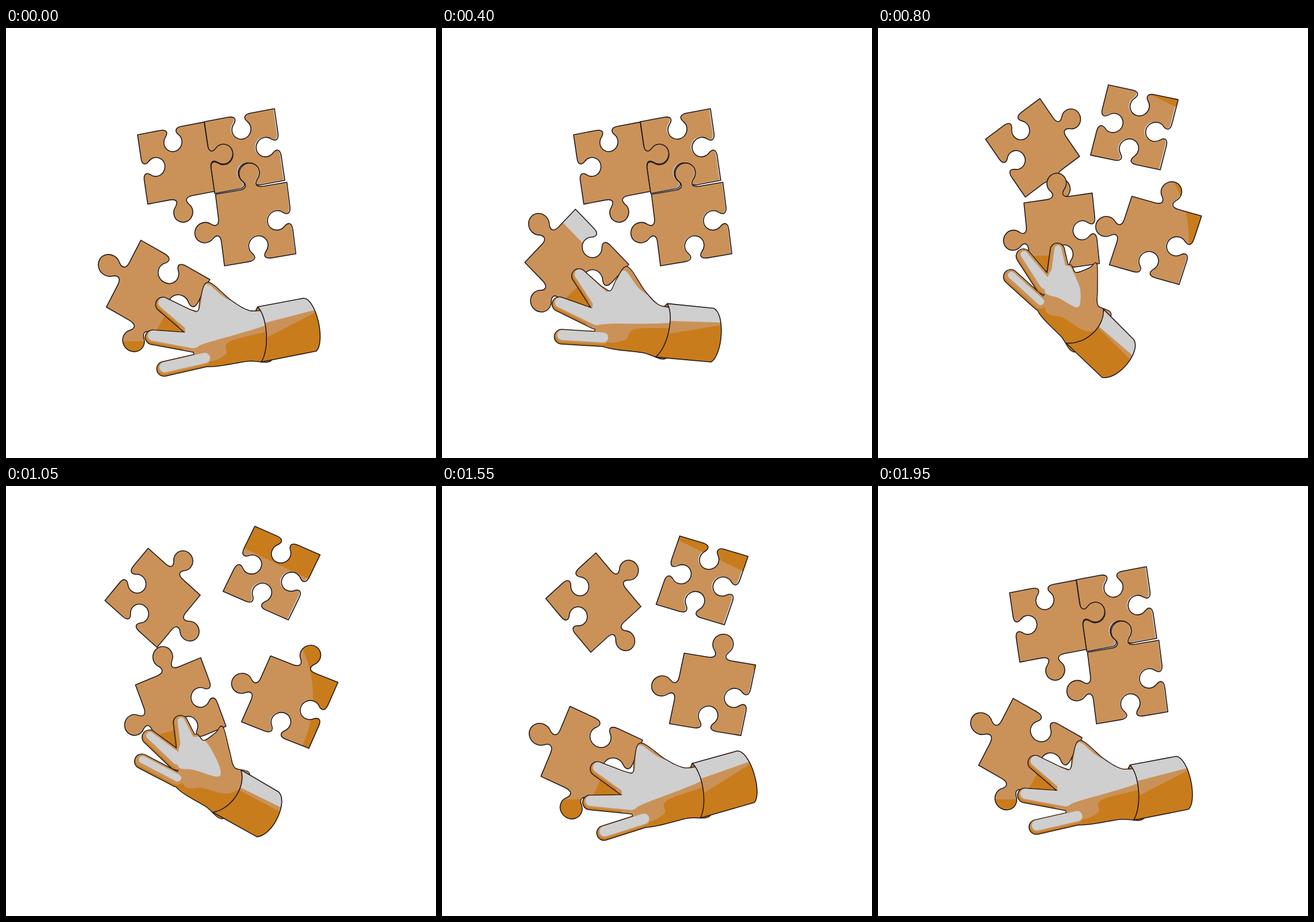
These frames come from a looping animation (748x748 px, 2 s). An HTML page:

```html
<!DOCTYPE html>
<html lang="en">
<head>
<meta charset="utf-8">
<title>Puzzle hand</title>
<style>
  html, body { margin: 0; width: 100%; height: 100%; overflow: hidden; background: #fff; }
  svg { display: block; width: 100vw; height: 100vh; }
  .line { fill: none; stroke: #21171b; stroke-width: 1.6; stroke-linejoin: round; vector-effect: non-scaling-stroke; }
  .rim { stroke-width: 3; }
  .light { fill: #cfcfcf; }
  .mid { fill: #ca9258; }
  .dark { fill: #c97c1b; }
</style>
</head>
<body>
<svg id="stage" viewBox="0 0 748 748"></svg>
<script>
const LOOP = 2000, STEP = 50;
const stage = document.getElementById('stage');
const $ = id => document.getElementById(id);
const setPath = (id, d) => $(id).setAttribute('d', d);
const rad = Math.PI / 180;

const clamp = s => Math.min(1, Math.max(0, s));
const smoothstep = s => (s = clamp(s)) * s * (3 - 2 * s);
const lerp = (a, b, s) => a + (b - a) * s;
const mix = (p, q, s) => [lerp(p[0], q[0], s), lerp(p[1], q[1], s)];
const bump = (t, at, width) => Math.exp(-(((t - at) / width) ** 2));

// Unit jigsaw outline; sides run top, right, bottom, left: 1 = tab, -1 = notch.
function jigsaw(sides) {
  let d = 'M0 0';
  sides.forEach((sign, i) => {
    const [x, y, dx, dy] = [[0, 0, 1, 0], [1, 0, 0, 1], [1, 1, -1, 0], [0, 1, 0, -1]][i];
    const k = sign > 0 ? 1 : .95;
    const at = (s, p) => {
      const u = .5 + (s - .5) * k, v = p * k * sign;
      return `${x + dx * u + dy * v} ${y + dy * u - dx * v} `;
    };
    d += `L${at(.33, 0)}C${at(.43, 0)}${at(.45, .05)}${at(.4, .11)}`
      + `A${.141 * k} ${.141 * k} 0 1 ${sign > 0 ? 1 : 0} ${at(.6, .11)}`
      + `C${at(.55, .05)}${at(.57, 0)}${at(.67, 0)}L${x + dx} ${y + dy}`;
  });
  return d + 'Z';
}

// Place the unit piece around its centre; the view skews it slightly.
function matrix({ x, y, angle, w, h }, dx = 0, dy = 0) {
  const a = angle * rad, b = (angle + 92.4) * rad;
  const ux = w * Math.cos(a), uy = w * Math.sin(a), vx = h * Math.cos(b), vy = h * Math.sin(b);
  return `matrix(${ux} ${uy} ${vx} ${vy} ${x - (ux + vx) / 2 + dx} ${y - (uy + vy) / 2 + dy})`;
}

// Pieces burst from home to away, peak, then fall back faster and faster.
const BURST = 580, RETURN = 850;
const spread = (t, peak) => t < peak
  ? 1 - (1 - clamp((t - BURST) / (peak - BURST))) ** 1.7
  : 1 - clamp((t - peak) / RETURN) ** 3;

// home and away: centre x, centre y, angle
const pieces = {
  B: { sides: [-1, -1, -1, -1], size: [124, 126], rim: 2.4, peak: 1050, home: [415, 214, -10.6], away: [462, 151.5, 23.6] },
  A: { sides: [-1, 1, 1, -1], size: [118, 122], rim: .7, peak: 1050, home: [295.7, 235, -10.8], away: [255, 194.5, -50.4] },
  C: { sides: [1, -1, -1, 1], size: [126, 125.5], rim: 1.6, peak: 930, home: [434.3, 341, -9.6], away: [493.7, 376, 21.5] },
  D: { sides: [1, -1, -1, 1], rim: 1 }
};

function loosePose({ size: [w, h], home, away, peak }, t) {
  const p = spread(t, peak);
  const [x, y, angle] = home.map((v, i) => lerp(v, away[i], p));
  return { x, y, angle, w, h };
}

function heldPose([x, y, angle]) {
  return { x, y, angle: angle - 62.7, w: 131 - .2 * angle, h: 138 - .27 * angle };
}

// Key poses of the hand: time, pivot x, pivot y, angle
const handKeys = [
  [0, 264.5, 461.5, 0],
  [400, 234.5, 409.5, 16.3],
  [800, 319.5, 357, 54.5],
  [1050, 304, 382, 40],
  [1350, 265, 461.5, 0],
  [1550, 260.5, 473.5, -4.8],
  [1950, 265, 461.8, 0],
  [LOOP, 264.5, 461.5, 0]
];

// Monotone cubic through the keys.
function handAt(t) {
  const slope = (i, j) => (handKeys[i + 1][j] - handKeys[i][j]) / (handKeys[i + 1][0] - handKeys[i][0]);
  const tangent = (i, j) => {
    if (i === 0 || i === handKeys.length - 1) return 0;
    const a = slope(i - 1, j), b = slope(i, j);
    return a * b <= 0 ? 0 : 2 * a * b / (a + b);
  };
  const i = Math.max(0, handKeys.findIndex(k => k[0] > t) - 1);
  const h = handKeys[i + 1][0] - handKeys[i][0], s = (t - handKeys[i][0]) / h, r = 1 - s;
  return [1, 2, 3].map(j => lerp(handKeys[i][j], handKeys[i + 1][j], smoothstep(s))
    + h * s * r * (tangent(i, j) * r - tangent(i + 1, j) * s));
}

// Key points of the hand seen flat and rolled; the rest blends between them.
const views = {
  palm: [
    '352,443 392,475 422,492 462,500 464,574 420,579 345,588 325,560 315,522 314,491 334,493 339,470',
    '380,411 381,455 382,483 404,502 347,562 318,535 278,490 292,460 300,432 332,412 344,426 368,418'],
  tone: [
    '345,430 480,470 480,517 390,545 382,568 345,579 300,540',
    '350,395 405,440 408,500 368,528 322,504 292,492 290,430'],
  glow: [
    '348,446 390,474 470,494 462,513 358,545 320,552 312,505 336,490',
    '341,428 351,452 352,475 345,486 315,470 290,458 304,418 331,414'],
  index: ['273,481 325,515', '312,387 314,430'],
  middle: ['255,538 325,547', '253,397 290,447'],
  little: ['275,593 345,577', '231,433 282,479'],
  cuff: [
    '438,485 518,470 540,472 556,545 540,562 444,581 458,560 456,505',
    '392,489 445,542 458,562 420,612 390,608 327,548 360,552 395,520']
};
const viewFrames = [handKeys[0], handKeys[2]];
const baseRadius = { index: 20, middle: 16, little: 12 };
const TIP = 12;

const turn = ([x, y], deg) => {
  const c = Math.cos(deg * rad), s = Math.sin(deg * rad);
  return [x * c - y * s, x * s + y * c];
};
const local = {};
for (const name in views) {
  local[name] = views[name].map((text, k) => {
    const [, cx, cy, deg] = viewFrames[k];
    return text.split(' ').map(pair => {
      const [x, y] = pair.split(',').map(Number);
      return turn([x - cx, y - cy], -deg);
    });
  });
}
const rollOf = angle => smoothstep((angle - 8) / 40);

function posed(name, [cx, cy, deg]) {
  const [flat, rolled] = local[name];
  return flat.map((p, i) => {
    const [x, y] = turn(mix(p, rolled[i], rollOf(deg)), deg);
    return [x + cx, y + cy];
  });
}

const polygon = pts => 'M' + pts.join('L') + 'Z';

function smooth(pts) {
  const n = pts.length, at = i => pts[(i + n) % n];
  const handle = (p, a, b) => [p[0] + (b[0] - a[0]) / 6, p[1] + (b[1] - a[1]) / 6];
  return 'M' + pts[0] + pts.map((p, i) => {
    const q = at(i + 1);
    return `C${handle(p, at(i - 1), q)} ${handle(q, at(i + 2), p)} ${q}`;
  }).join('') + 'Z';
}

// Tapered capsule; inset and shift turn it into the lit part of a finger.
function finger([tip, base], radius, inset = 0, dx = 0, dy = 0) {
  const r = TIP - inset, R = radius - inset;
  const len = Math.hypot(tip[0] - base[0], tip[1] - base[1]);
  const nx = (base[1] - tip[1]) / len, ny = (tip[0] - base[0]) / len;
  const at = ([x, y], k) => `${x + nx * k + dx} ${y + ny * k + dy} `;
  return `M${at(base, R)}L${at(tip, r)}A${r} ${r} 0 0 0 ${at(tip, -r)}L${at(base, -R)}A${R} ${R} 0 0 0 ${at(base, R)}Z`;
}

const fingers = Object.keys(baseRadius), limbs = ['palm', ...fingers];
const path = (id, cls = '') => `<path id="${id}" class="${cls}"/>`;
const flood = cls => `<rect class="${cls}" width="748" height="748"/>`;
const clipped = (id, masks, inner) =>
  `<clipPath id="${id}Clip">${masks.map(m => path(m)).join('')}</clipPath><g clip-path="url(#${id}Clip)">${inner}</g>`;
const shades = {
  A: '',
  B: path('shadeB', 'dark'),
  C: '<path id="shadeC" class="dark" fill-rule="evenodd"/>',
  D: path('shadow', 'dark') + '<rect class="dark" y="545" width="748" height="203"/>'
    + '<rect id="glint" class="light" y="-.1" width="1" height=".58"/>'
};

stage.innerHTML = Object.keys(pieces).map(id =>
  clipped(id, [id + 'Mask'], flood('light') + path(id + 'Face', 'mid') + shades[id]) + path(id + 'Line', 'line')).join('')
  + path('mouth', 'dark') + path('mouthLine', 'line')
  + limbs.map(id => path(id + 'Line', 'line rim')).join('')
  + clipped('hand', limbs.map(id => id + 'Mask'),
    flood('dark') + path('tone', 'mid') + fingers.map(id => path(id + 'Tone', 'mid')).join('')
    + path('glow', 'light') + fingers.map(id => path(id + 'Glow', 'light')).join(''))
  + clipped('cuff', ['cuffMask'], flood('dark') + path('cuffTone', 'mid') + path('cuffGlow', 'light'))
  + path('cuffLine', 'line');

for (const id in pieces) {
  const d = jigsaw(pieces[id].sides);
  for (const part of ['Mask', 'Face', 'Line']) setPath(id + part, d);
}

function drawPieces(t, hand) {
  for (const id in pieces) {
    const piece = pieces[id];
    const pose = id === 'D' ? heldPose(hand) : loosePose(piece, t);
    for (const part of ['Mask', 'Line']) $(id + part).setAttribute('transform', matrix(pose));
    $(id + 'Face').setAttribute('transform', matrix(pose, -piece.rim, -piece.rim / 3));
  }
  const y = 70 + 60 * spread(t, pieces.B.peak), cx = 370 - 36 * spread(t, pieces.C.peak);
  setPath('shadeB', `M360 0H600V${y + 67}L360 ${y - 48}Z`);
  setPath('shadeC', `M0 0H748V748H0ZM${cx - 200} 367a200 200 0 1 0 400 0a200 200 0 1 0-400 0Z`);
  $('glint').setAttribute('transform', matrix(heldPose(hand)));
  $('glint').setAttribute('x', 1.05 - .3 * bump(t, 400, 120));
}

function drawHand(hand) {
  const roll = rollOf(hand[2]), shape = name => posed(name, hand);
  const outline = (id, d) => { setPath(id + 'Mask', d); setPath(id + 'Line', d); };
  outline('palm', smooth(shape('palm')));
  for (const id of fingers) {
    const bone = shape(id), radius = baseRadius[id];
    outline(id, finger(bone, radius));
    setPath(id + 'Tone', finger(bone, radius, 1, .5, -2));
    setPath(id + 'Glow', finger(bone, radius, 3 + 3 * roll, 1, -3));
  }
  setPath('tone', smooth(shape('tone')));
  setPath('glow', smooth(shape('glow')));
  const [tip, base] = shape('index'), [tip2, base2] = shape('middle');
  setPath('shadow', polygon([mix(tip, base, .2), tip2, base2]));
}

function drawCuff(t, hand) {
  const [a, b, c, d, e, f, g, h] = posed('cuff', hand), roll = rollOf(hand[2]);
  const cuff = `M${a}L${b}C${c} ${d} ${e}L${f}C${g} ${h} ${a}Z`;
  setPath('cuffMask', cuff);
  setPath('cuffLine', cuff);
  const opposite = p => [a[0] + f[0] - p[0], a[1] + f[1] - p[1]];
  const mouth = `M${a}C${opposite(g)} ${opposite(h)} ${f}C${g} ${h} ${a}Z`;
  setPath('mouth', mouth);
  setPath('mouthLine', mouth);
  const band = (near, far) => {
    const p = mix(a, f, near), q = mix(b, e, far);
    return polygon([a, mix(a, b, 1.6), mix(p, q, 1.6), p]);
  };
  setPath('cuffTone', band(lerp(.62, .34, roll), .34));
  setPath('cuffGlow', band(.32, .26));
  $('cuffGlow').setAttribute('opacity', 1 - bump(t, 1350, 50));
}

const start = performance.now();
function tick() {
  const elapsed = (performance.now() - start) % LOOP;
  const t = Math.floor(elapsed / STEP) * STEP, hand = handAt(t);
  drawPieces(t, hand);
  drawHand(hand);
  drawCuff(t, hand);
  requestAnimationFrame(tick);
}
tick();
</script>
</body>
</html>
```
